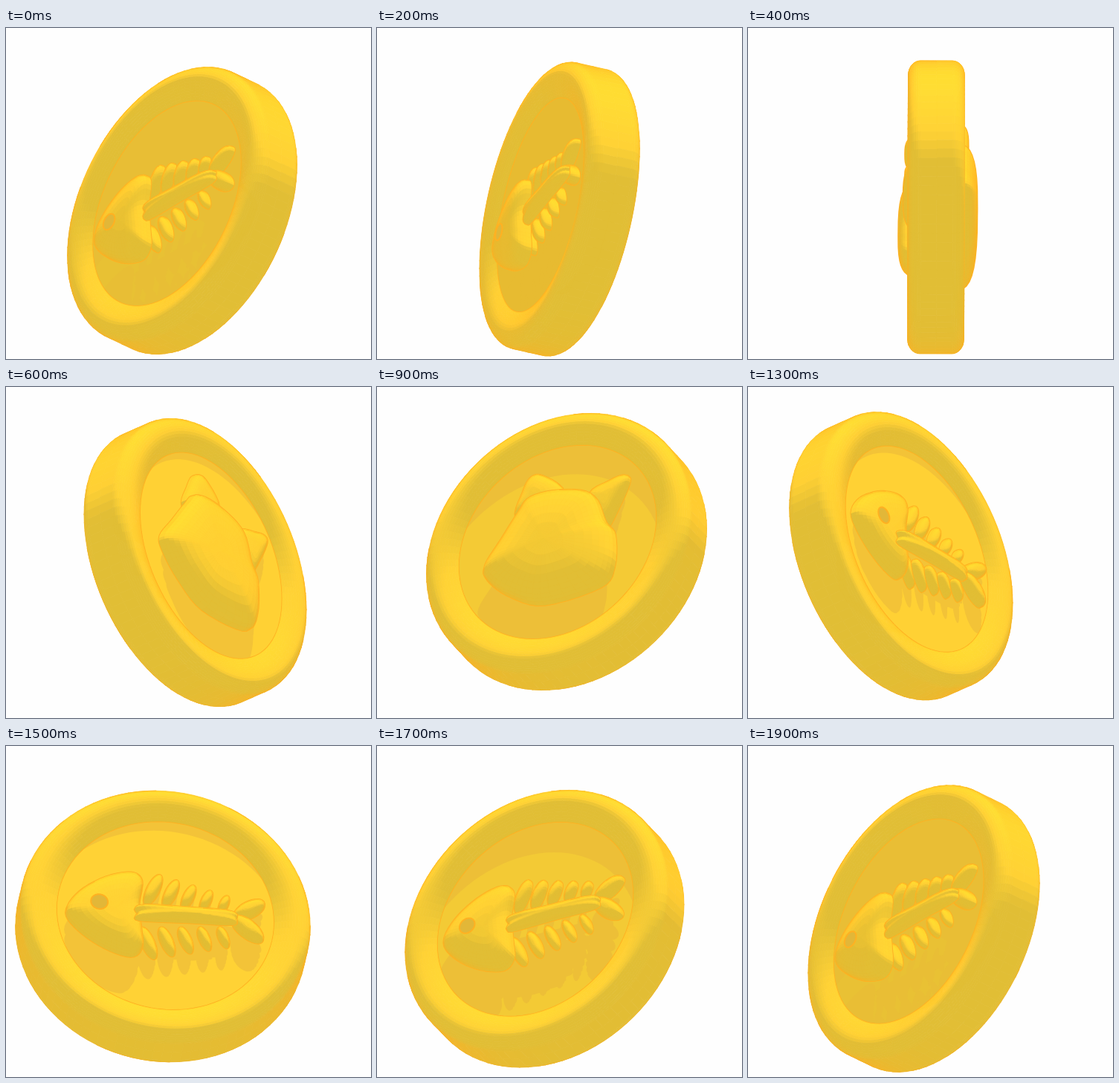
An HTML page with a canvas for the animation above (2 s loop, 491 px wide and 445 px high).

```html
<!DOCTYPE html>
<html lang="en">
<head>
<meta charset="utf-8">
<title>Spinning coin</title>
<style>
html, body { margin: 0; width: 100%; height: 100%; overflow: hidden; background: #fefefe; }
canvas { display: block; }
</style>
</head>
<body>
<canvas id="stage" width="491" height="445"></canvas>
<script>
const ctx = document.getElementById('stage').getContext('2d');
const TAU = Math.PI * 2, RAD = Math.PI / 180;
const STEP = 100, STEPS = 20;
const FLOOR_R = 148, FLOOR_Z = 28, RIDGE_R = 172, RIDGE_H = 9.5;
const PITCH = 31 * RAD;
const LIGHT = [0.141, 0.94, -0.31];
const DARK = [225, 190, 53], MID = [255, 210, 53], BRIGHT = [255, 228, 52], GLOW = [255, 174, 32];
const LINE = '#ffb122';

// step, spin in degrees, centre x, centre y
const KEYS = [
  [-1, 40.5, 233, 246], [0, 47.2, 237, 245.5], [4, 89.7, 253, 241], [6, 130.5, 254.5, 236],
  [8, 180, 259, 228], [9, 205.5, 255, 221.5], [11, 262, 222, 214], [12, 288, 207, 219],
  [15, 353, 211, 242.5], [18, 400.5, 233, 246], [19, 406.6, 236.5, 245.5], [20, 413, 239, 245]
];

const dot = (a, b) => a[0] * b[0] + a[1] * b[1] + a[2] * b[2];
const sub = (a, b) => [a[0] - b[0], a[1] - b[1], a[2] - b[2]];
const cross = (a, b) => [a[1] * b[2] - a[2] * b[1], a[2] * b[0] - a[0] * b[2], a[0] * b[1] - a[1] * b[0]];
const mix = (a, b, t) => a.map((v, i) => v + (b[i] - v) * t);
const range = (n, fn) => Array.from({ length: n }, (_, i) => fn(i));

function poseAt(step) {
  const i = Math.max(1, KEYS.findLastIndex(key => key[0] <= step));
  const [a, b, c, d] = [-1, 0, 1, 2].map(o => KEYS[i + o]);
  if (!d) return b;
  const span = c[0] - b[0], t = (step - b[0]) / span;
  return b.map((v, n) => {
    const m0 = (c[n] - a[n]) / (c[0] - a[0]) * span;
    const m1 = (d[n] - b[n]) / (d[0] - b[0]) * span;
    const k = t * t * (3 - 2 * t);
    return v * (1 - k) + c[n] * k + m0 * t * (1 - t) ** 2 - m1 * t * t * (1 - t);
  });
}

// Axes of one coin face in camera space (x right, y up, z to the viewer).
function makeFace(degrees, x, y) {
  const s = Math.sin(degrees * RAD), c = Math.cos(degrees * RAD);
  const sp = Math.sin(PITCH), cp = Math.cos(PITCH);
  return { x, y, e: [c, s * sp, s * cp], v: [0, cp, -sp], n: [-s, c * sp, c * cp] };
}

function project(face, [u, v, z]) {
  const at = i => u * face.e[i] + v * face.v[i] + z * face.n[i];
  return [face.x + at(0), face.y - at(1), at(2)];
}

function shade(n) {
  const light = dot(n, LIGHT);
  const base = light < 0.22
    ? mix(DARK, MID, Math.max(0, light) / 0.22)
    : mix(MID, BRIGHT, Math.min(1, (light - 0.22) / 0.5));
  const rgb = mix(base, GLOW, 0.75 * (1 - Math.max(0, n[2])) ** 3);
  return `rgb(${rgb.map(Math.round)})`;
}

function trace(points) {
  points.forEach(([x, y], i) => i ? ctx.lineTo(x, y) : ctx.moveTo(x, y));
  ctx.closePath();
}

// Grid rows run outward, columns counter-clockwise.
function visibleQuads(face, rows) {
  const grid = rows.map(row => row.map(p => project(face, p)));
  const quads = [];
  for (let i = 0; i + 1 < grid.length; i++) {
    const a = grid[i], b = grid[i + 1];
    for (let j = 0; j < a.length; j++) {
      const k = (j + 1) % a.length;
      const d = cross(sub(b[k], a[j]), sub(a[k], b[j]));
      // Screen y points down, so the normal's x and z change sign.
      const n = [-d[0], d[1], -d[2]], len = Math.hypot(...n);
      if (len < 1e-6 || n[2] <= 0) continue;
      quads.push({ points: [a[j], a[k], b[k], b[j]], colour: shade(n.map(v => v / len)) });
    }
  }
  return quads;
}

function drawMesh(face, rows, outlined) {
  const quads = visibleQuads(face, rows);
  ctx.lineJoin = 'round';
  if (outlined) {
    ctx.beginPath();
    quads.forEach(q => trace(q.points));
    ctx.strokeStyle = LINE;
    ctx.lineWidth = 2.8;
    ctx.stroke();
  }
  ctx.lineWidth = 0.8;
  for (const { points, colour } of quads) {
    ctx.beginPath();
    trace(points);
    ctx.fillStyle = ctx.strokeStyle = colour;
    ctx.fill();
    ctx.stroke();
  }
}

function ring(radius, z, count = 96) {
  return range(count, j => [radius * Math.cos(j / count * TAU), radius * Math.sin(j / count * TAU), z]);
}

function smooth(points, parts = 5) {
  const at = i => points[(i + points.length) % points.length];
  return points.flatMap((p, i) => range(parts, j => {
    const t = j / parts, a = at(i - 1), c = at(i + 1), d = at(i + 2);
    return [0, 1].map(n => p[n] + 0.5 * t * (c[n] - a[n]
      + t * (2 * a[n] - 5 * p[n] + 4 * c[n] - d[n] + t * (3 * (p[n] - c[n]) + d[n] - a[n]))));
  }));
}

// A rounded swelling over an outline, from its top down to the floor.
function dome(outline, height) {
  const centre = [0, 1].map(n => outline.reduce((sum, p) => sum + p[n], 0) / outline.length);
  return range(10, i => {
    const s = (1 - i / 9) * Math.PI / 2;
    const scale = Math.max(0, Math.cos(s)) ** 0.7, z = FLOOR_Z + height * Math.sin(s) ** 0.7;
    return outline.map(p => [...mix(centre, p, scale), z]);
  });
}

function lobe(u, v, a, b, degrees, height) {
  const c = Math.cos(degrees * RAD), s = Math.sin(degrees * RAD);
  const outline = range(28, j => {
    const x = a * Math.cos(j / 28 * TAU), y = b * Math.sin(j / 28 * TAU);
    return [u + x * c - y * s, v + x * s + y * c];
  });
  return dome(outline, height);
}

const fish = [
  ...range(5, i => lobe(-17 + 24 * i, 38 - 4 * i, 25 - 3 * i, 8.5 - 0.7 * i, 67, 11)),
  ...range(5, i => lobe(-24 + 25.5 * i, -46 + 4 * i, 25 - 2.3 * i, 8.5 - 0.6 * i, -68, 11)),
  lobe(113, 15, 24, 11, 33, 14),
  lobe(111, -15, 26, 12, -40, 14),
  dome(smooth([[-135, -5], [-118, -32], [-83, -57], [-47, -68], [-32, -54], [-33, -27],
    [-36, 11], [-32, 49], [-47, 61], [-83, 51], [-118, 26]]), 22),
  dome(smooth([[-36, 10], [-38, 0], [-36, -10], [30, -9], [90, -8], [96, 1], [90, 9], [30, 10]]), 16)
];

const cat = [
  dome(smooth([[-60, 50], [-20, 40], [10, 75], [-20, 107], [-38, 107], [-50, 85]]), 15),
  dome(smooth([[50, 20], [72, 0], [92, 30], [108, 66], [102, 76], [80, 72], [50, 60]]), 15),
  dome(smooth([[9, 76], [-36, 76], [-54, 57], [-81, 19], [-106, -17], [-101, -38], [-69, -69],
    [-19, -94], [65, -88], [85, -61], [86, -11], [72, 13], [54, 58]]), 27)
];

const halfBody = [
  ...range(9, i => ring(FLOOR_R + 31 * i / 8, FLOOR_Z + RIDGE_H * Math.sin(i / 8 * Math.PI / 2))),
  ...range(8, i => {
    const a = (i + 1) / 8 * Math.PI / 2;
    return ring(179 + 18 * Math.sin(a), 21.5 + 16 * Math.cos(a));
  }),
  ring(197, 0)
];

function drawFloor(face, relief) {
  const edge = ring(FLOOR_R, FLOOR_Z).map(p => project(face, p));
  const facing = dot(face.n, LIGHT), fall = Math.max(0.05, facing);
  const drift = [-dot(face.e, LIGHT) / fall, -dot(face.v, LIGHT) / fall];
  const cast = ([u, v, z]) => {
    const h = z - FLOOR_Z;
    return project(face, [u + h * drift[0], v + h * drift[1], FLOOR_Z]);
  };
  ctx.save();
  ctx.beginPath();
  trace(edge);
  ctx.fillStyle = shade(face.n);
  ctx.fill();
  ctx.clip();

  // The ridge leaves a lit circle; the relief throws its slices into it.
  ctx.beginPath();
  trace(ring(2000, FLOOR_Z).map(p => project(face, p)));
  trace(ring(RIDGE_R, FLOOR_Z + RIDGE_H).reverse().map(cast));
  relief.forEach(rows => rows.forEach(row => trace(row.map(cast))));
  const alpha = 0.4 * Math.min(1, Math.max(0, facing) * 6 + 0.1);
  ctx.fillStyle = `rgba(225,172,60,${alpha})`;
  ctx.fill();
  ctx.restore();

  ctx.beginPath();
  trace(edge);
  ctx.strokeStyle = LINE;
  ctx.lineWidth = 2.6;
  ctx.stroke();
}

function drawEye(face) {
  ctx.beginPath();
  trace(ring(11.5, FLOOR_Z + 21, 32).map(([u, v, z]) => project(face, [u - 92, v + 3, z])));
  ctx.fillStyle = '#e2b738';
  ctx.strokeStyle = LINE;
  ctx.lineWidth = 2;
  ctx.fill();
  ctx.stroke();
}

function draw(step) {
  const [, spin, x, y] = poseAt(step);
  const sides = [
    { face: makeFace(spin, x, y), relief: fish },
    { face: makeFace(spin + 180, x, y), relief: cat }
  ];
  const [back, front] = sides.sort((a, b) => a.face.n[2] - b.face.n[2]);
  const drawRelief = side => side.relief.forEach(rows => drawMesh(side.face, rows, true));
  const edgeOn = front.face.n[2] < 0.1;

  ctx.fillStyle = '#fefefe';
  ctx.fillRect(0, 0, 491, 445);
  drawRelief(back);
  if (edgeOn) drawRelief(front);
  drawMesh(back.face, halfBody);
  drawFloor(front.face, front.relief);
  drawMesh(front.face, halfBody);
  if (!edgeOn) drawRelief(front);
  if (front.relief === fish && front.face.n[2] > 0.2) drawEye(front.face);
}

let shown = -1;
function tick() {
  const step = Math.floor(performance.now() / STEP) % STEPS;
  if (step !== shown) draw(shown = step);
  requestAnimationFrame(tick);
}
tick();
</script>
</body>
</html>
```
